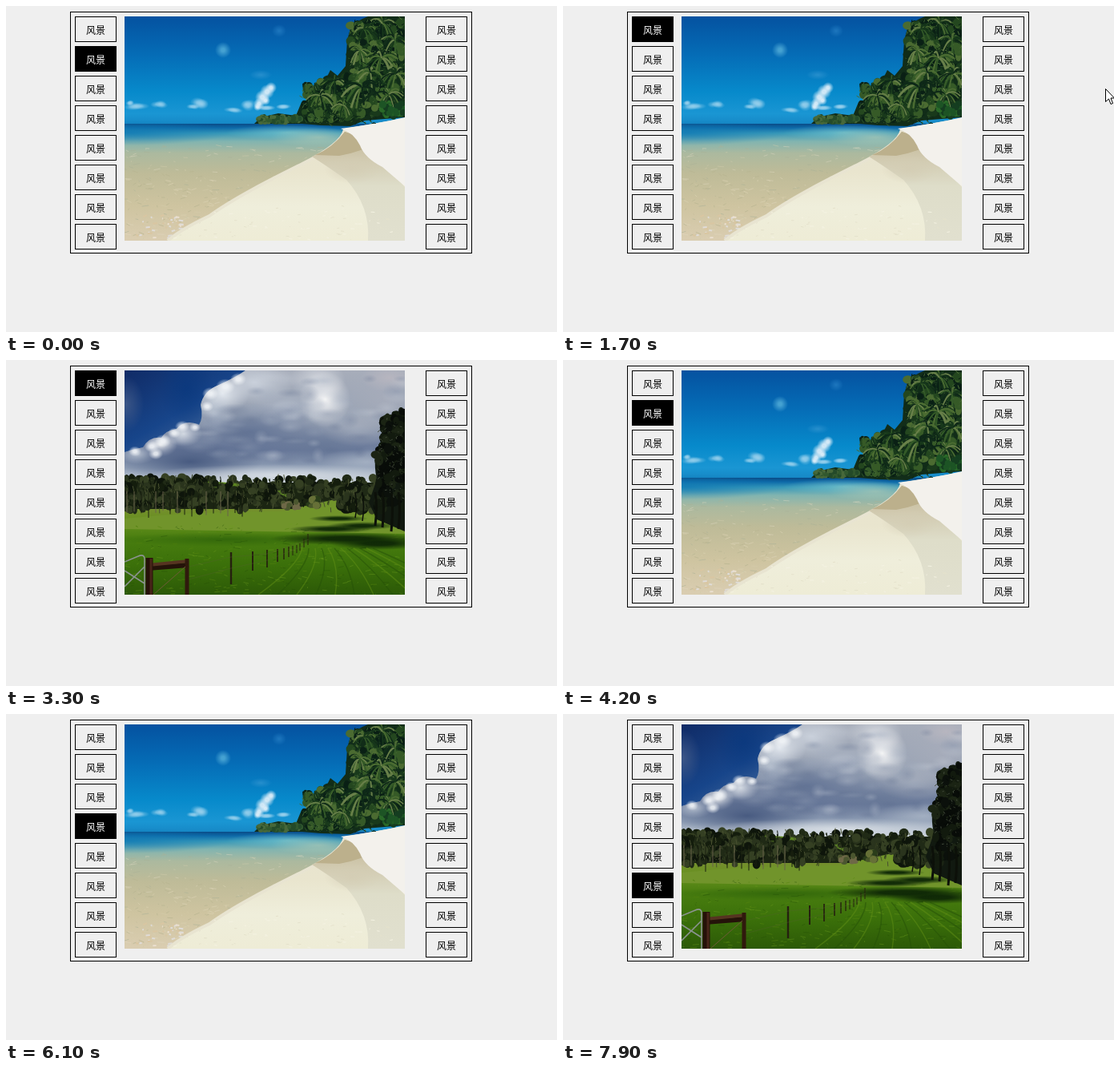
Recreate the animation shown at these times as an HTML page with a canvas. Size 688 px wide and 407 px high, loop 8000 ms.

```html
<!DOCTYPE html>
<html lang="zh-CN">
<head>
<meta charset="utf-8">
<style>
html, body { margin: 0; width: 100%; height: 100%; overflow: hidden; background: #efefef; }
#box { position: absolute; left: 80px; top: 7px; width: 500px; height: 300px; border: 1px solid #000; }
canvas { position: absolute; left: 148px; top: 13px; visibility: hidden; }
.tab { position: absolute; box-sizing: border-box; width: 52px; height: 32px; border: 1px solid #000;
  font: 12px/31px "Noto Sans CJK SC", "Noto Sans CJK", sans-serif; text-align: center; color: #000; }
.tab.on { background: #000; color: #fff; }
#cursor { position: absolute; visibility: hidden; }
</style>
</head>
<body>
<div id="box"></div>
<svg id="cursor" width="12" height="21"><path d="M.5.5V16.5L4.5 13L7 19.5L9.5 18.5L7 12H11.5Z" fill="#fff" stroke="#000"/></svg>
<script>
const cursor = document.getElementById('cursor');
let ctx, seed = 7;
const rnd = (a = 0, b = 1) => {
  seed = (seed * 16807) % 2147483647;
  return a + (b - a) * seed / 2147483647;
};
const pick = list => list[Math.floor(rnd(0, list.length))];

// Scenes are drawn in stage coordinates
function scene(draw) {
  const canvas = document.createElement('canvas');
  canvas.width = 350;
  canvas.height = 280;
  document.body.insertBefore(canvas, cursor);
  ctx = canvas.getContext('2d');
  ctx.translate(-148, -13);
  draw();
  return canvas;
}
function linear(x0, y0, x1, y1, stops) {
  const g = ctx.createLinearGradient(x0, y0, x1, y1);
  stops.forEach(([at, color]) => g.addColorStop(at, color));
  return g;
}
const down = (y0, y1, ...stops) => linear(0, y0, 0, y1, stops);
function rect(x, y, w, h, fill) {
  ctx.fillStyle = fill;
  ctx.fillRect(x, y, w, h);
}
function shape(d, fill) {
  ctx.fillStyle = fill;
  ctx.fill(new Path2D(d));
}
function line(d, color, width = 1) {
  ctx.strokeStyle = color;
  ctx.lineWidth = width;
  ctx.stroke(new Path2D(d));
}
function soft(x, y, rx, ry, rgb, alpha, core = 0) {
  ctx.save();
  ctx.translate(x, y);
  ctx.scale(rx, ry);
  const g = ctx.createRadialGradient(0, 0, core, 0, 0, 1);
  g.addColorStop(0, `rgba(${rgb},${alpha})`);
  g.addColorStop(1, `rgba(${rgb},0)`);
  ctx.fillStyle = g;
  ctx.fillRect(-1, -1, 2, 2);
  ctx.restore();
}
// Short random strokes inside a rectangle, optionally clipped by a path
function flecks(n, x, y, w, h, colors, dx, dy, width = 1, clip) {
  ctx.save();
  if (clip) ctx.clip(new Path2D(clip));
  for (let i = 0; i < n; i++) {
    const px = x + rnd(0, w), py = y + rnd(0, h);
    line(`M${px} ${py}l${rnd(-dx, dx)} ${rnd(-dy, dy)}`, pick(colors), width);
  }
  ctx.restore();
}
function bushes(n, x, y, w, h, r, colors) {
  for (let i = 0; i < n; i++) {
    ctx.fillStyle = pick(colors);
    ctx.beginPath();
    ctx.ellipse(x + rnd(0, w), y + rnd(0, h), rnd(.5, 1) * r, rnd(.5, 1) * r, 0, 0, 7);
    ctx.fill();
  }
}
function palm(x, y, r, colors, baseY) {
  if (baseY) line(`M${x} ${y}Q${x + 3} ${(y + baseY) / 2} ${x + 1} ${baseY}`, '#5b5430', 1.3);
  for (let i = 0; i < 20; i++) {
    const a = rnd(0, 6.28), len = r * rnd(.65, 1.05);
    const ex = x + Math.cos(a) * len, ey = y + Math.sin(a) * len * .75 + r * .35;
    line(`M${x} ${y}Q${(x + ex) / 2} ${(y + ey) / 2 - r * .4} ${ex} ${ey}`, pick(colors), Math.max(1.2, r / 11));
  }
}

function beach() {
  rect(148, 13, 350, 135, down(13, 148, [0, '#0552a0'], [.35, '#056cb6'], [.7, '#078acb'], [.9, '#1a96d3'], [1, '#1687c5']));
  soft(271, 55, 10, 10, '90,180,220', .75, .2);
  soft(341, 31, 9, 8, '40,130,200', .7);
  soft(318, 86, 14, 6, '70,160,215', .5);
  for (const [x, y, w, h] of [[165, 125, 18, 5], [154, 121, 7, 4], [191, 123, 12, 5], [240, 121, 14, 8], [233, 126, 9, 4],
    [285, 130, 14, 4], [301, 124, 12, 7], [347, 126, 14, 4], [322, 127, 16, 4]])
    for (let i = 0; i < 4; i++)
      soft(x + rnd(-w, w) * .4, y + rnd(-h, h) * .3, w * .6, h * .8, '160,212,238', .55, .1);
  for (const [x, y, r] of [[316, 122, 7], [320, 114, 9], [326, 107, 9], [331, 102, 7], [324, 118, 6], [314, 126, 5]])
    soft(x, y, r, r, '225,240,250', .9, .25);

  // Water turning from deep blue to shallow sand
  rect(148, 147, 350, 146, down(147, 293, [0, '#0a4c87'], [.035, '#0d69a8'], [.08, '#3798b8'], [.15, '#81b4b0'],
    [.25, '#abb99f'], [.42, '#bebb98'], [.7, '#cec4a0'], [1, '#dacdb1']));
  soft(150, 158, 130, 16, '14,120,180', .8);
  soft(350, 158, 75, 10, '125,200,205', .7);
  soft(390, 164, 60, 12, '185,205,180', .6);
  flecks(190, 148, 175, 260, 118, ['#d6cfae66', '#a9b19788', '#e3dcc566'], 9, 2);
  flecks(100, 148, 205, 130, 88, ['#dbd3b3aa', '#b8b491aa'], 7, 3);
  flecks(55, 165, 262, 60, 31, ['#eadfcf', '#d9c6a2', '#dfdcd8'], 6, 2, 2);

  const sand = 'M423 153C421 166 402 181 370 197S287 238 254 262Q218 279 202 293H498V140Z';
  shape(sand, down(150, 293, [0, '#e7e2ce'], [.4, '#e9e5ce'], [.7, '#efeedb'], [1, '#eeecd6']));
  line('M423 154C421 166 402 181 370 197S287 238 254 262Q218 279 202 293', '#e8e4d1', 4);
  shape('M423 157L436 161L446 176L470 195L498 226V293H452Q455 250 425 217Q398 198 382 188Q408 178 423 157Z',
    down(157, 293, [0, '#c0b593'], [.25, '#d1cab0'], [.5, '#deddc9'], [1, '#e1e0cf']));
  shape('M423 157L437 162L446 179L430 184L416 187L386 186Q408 177 423 157Z', '#bcb08c');
  soft(432, 204, 35, 18, '211,204,179', .7);
  shape('M418 153Q460 148 498 139V225L470 201Q448 190 442 174Q434 158 418 153Z', '#f3f1ec');
  flecks(80, 205, 250, 280, 43, ['#e5e2cc', '#f4f2e2'], 5, 1, 1, sand);

  const greens = ['#112c18', '#19391b', '#24471f', '#0a2015', '#365a27', '#4b6b31'];
  shape('M310 147L318 139L340 134L362 137L369 120L382 115L385 96L399 92L405 80L414 87L424 75L426 43L431 24L445 16L452 13H498V139L448 143L430 150L394 149L370 147Z', '#122d19');
  bushes(70, 314, 138, 55, 7, 4, ['#31582e', '#244a29', '#47683a']);
  bushes(75, 372, 98, 42, 45, 6, greens);
  bushes(70, 390, 87, 105, 50, 8, greens);
  bushes(110, 429, 20, 69, 83, 7, greens);
  flecks(250, 429, 17, 69, 112, ['#315629', '#091d13', '#51713a', '#3e6031'], 5, 6);
  flecks(110, 370, 95, 55, 48, ['#466a36', '#0c2718', '#2c522a'], 4, 5);
  for (const [x, y, r] of [[447, 29, 18], [470, 22, 20], [486, 42, 19], [441, 55, 18], [410, 94, 18], [469, 65, 23],
    [487, 85, 21], [455, 83, 22], [444, 101, 27], [392, 112, 18], [478, 110, 20], [421, 124, 17]])
    palm(x, y, r, ['#17371b', '#345a28', '#4b6c32', '#69804a', '#0e2818']);
  bushes(45, 470, 121, 28, 17, 5, ['#1d5425', '#2a6928', '#153d20']);
  flecks(55, 384, 137, 80, 10, ['#0c2615', '#365b2a'], 5, 4);
}

function field() {
  rect(148, 13, 350, 145, linear(148, 13, 230, 150, [[0, '#102b66'], [.5, '#17458a'], [1, '#5877a0']]));
  soft(150, 55, 22, 35, '85,105,145', .6);
  soft(225, 35, 35, 45, '8,55,125', .7);
  const cloud = 'M148 115Q160 111 171 109Q179 95 194 97Q199 88 213 86Q224 73 241 81Q247 72 243 56Q247 38 266 31Q286 22 299 13H498V157H148Z';
  shape(cloud, down(13, 155, [0, '#a7adba'], [.4, '#99a3b4'], [.7, '#69799a'], [.86, '#8e9db4'], [1, '#d1d8df']));
  ctx.save();
  ctx.clip(new Path2D(cloud));
  for (const [x, y, rx, ry, rgb, a] of [
    [270, 42, 34, 25, '230,235,241', 1], [310, 28, 50, 27, '206,213,223', .9], [260, 67, 22, 30, '199,208,220', .8],
    [193, 106, 21, 15, '242,243,244', 1], [222, 92, 23, 16, '219,224,231', 1], [165, 118, 22, 12, '209,217,226', .9],
    [398, 49, 32, 35, '247,247,247', 1], [389, 25, 35, 25, '220,223,229', .8], [350, 61, 50, 27, '174,183,199', .8],
    [305, 90, 90, 36, '92,110,145', .8], [230, 127, 90, 25, '66,85,124', .9], [397, 107, 65, 24, '101,118,149', .7],
    [472, 49, 50, 45, '168,173,187', .7], [439, 83, 50, 25, '176,182,194', .6], [478, 22, 35, 18, '190,186,194', .7],
    [450, 127, 65, 16, '176,187,202', .7], [345, 144, 170, 14, '218,224,230', .9]])
    soft(x, y, rx, ry, rgb, a);
  for (let i = 0; i < 95; i++)
    soft(rnd(240, 498), rnd(20, 130), rnd(8, 24), rnd(4, 11), pick(['209,215,224', '92,108,141', '158,170,189']), .25);
  ctx.restore();
  for (const [x, y, r] of [[255, 42, 10], [274, 33, 12], [290, 24, 10], [251, 58, 8], [210, 91, 8], [196, 101, 10],
    [220, 83, 9], [236, 84, 7], [182, 108, 9], [161, 114, 8], [187, 117, 9]])
    soft(x, y, r, r * .8, '242,245,248', .85, .25);

  const greens = ['#141d0d', '#202a16', '#2a341d', '#0e150b', '#354023'];
  rect(148, 153, 350, 39, '#1b2512');
  bushes(75, 148, 146, 92, 13, 6, greens);
  bushes(80, 230, 146, 268, 18, 6, greens);
  shape('M230 153Q265 149 310 158V163Q280 163 249 157Z', '#5d8521');
  shape('M335 164Q349 156 357 163L354 173Z', '#597d25');
  rect(148, 186, 350, 107, down(186, 293, [0, '#758f2e'], [.15, '#65901d'], [.35, '#487d0f'], [.65, '#3b700a'], [1, '#2c5907']));
  shape('M148 198Q240 188 345 189Q382 180 411 174L432 190L498 200V217L148 211Z', '#71942b');
  bushes(150, 148, 151, 155, 37, 6, greens);
  bushes(45, 305, 153, 52, 27, 6, greens);
  bushes(65, 363, 152, 88, 20, 6, greens);
  bushes(70, 414, 158, 50, 29, 8, greens);
  flecks(350, 148, 148, 305, 38, ['#48502f', '#0d150a', '#343e20'], 2, 7);
  for (let x = 151; x < 300; x += 9) line(`M${x} 164V${rnd(188, 197)}`, pick(['#69624b', '#1b2010']));
  bushes(13, 377, 172, 13, 12, 5, ['#49572a', '#2a3d1a', '#667037']);
  bushes(13, 346, 177, 19, 8, 4, ['#6e6847', '#4b562f']);

  flecks(330, 148, 205, 350, 88, ['#6f9d2066', '#234f0766', '#55840e88'], 9, 2);
  soft(275, 224, 140, 9, '31,83,7', .5);
  for (const [x, y, rx, ry] of [[425, 223, 96, 8], [407, 211, 54, 5], [466, 229, 62, 8], [415, 198, 37, 4], [445, 207, 45, 5]])
    soft(x, y, rx, ry, '14,39,6', .95, .3);
  for (let i = 0; i < 12; i++)
    line(`M${370 + i * 8} 235Q${365 + i * 13} 257 ${315 + i * 24} 293`, i % 2 ? '#26510988' : '#6290157a', 1.5);

  // Near trees on the right
  const dark = ['#0b100b', '#121a0e', '#1b2414', '#080c08'];
  shape('M498 61Q472 76 471 101Q456 118 463 149L453 178L463 199L498 214Z', '#111910');
  bushes(90, 470, 72, 30, 72, 8, dark);
  bushes(75, 462, 107, 36, 82, 8, dark);
  bushes(25, 484, 61, 15, 20, 5, dark);
  flecks(120, 466, 73, 32, 105, ['#30372a', '#424b3b', '#050906'], 3, 3);
  for (const [x, y] of [[436, 197], [445, 201], [461, 207], [470, 209], [481, 214], [490, 211]])
    line(`M${x} 165Q${x + 3} 183 ${x} ${y}`, '#0c1009', x > 450 ? 3 : 1.5);

  for (const [x, top, end, w] of [[281, 240, 280, 2.4], [308, 239, 263, 2], [326, 237, 259, 1.7], [339, 236, 252, 1.6],
    [347, 235, 249, 1.4], [353, 233, 246, 1.3], [358, 232, 244, 1], [363, 231, 241, 1], [367, 229, 238, 1], [372, 223, 234, 1], [377, 217, 231, 1]])
    line(`M${x} ${top}V${end}`, '#25200f', w);
  line('M228 258L281 246L326 242L378 224M228 274L281 260L326 250L372 232', '#52602c88', .7);
  line('M148 252L165 245Q174 241 173 251V293M148 263L173 279M148 283L173 258', '#8b9390', 1.6);
  line('M177 260L228 256', '#241309', 6);
  line('M178 256L228 251', '#563421', 4);
  line('M179 247V293', '#251109', 9);
  line('M181 248V293', '#482519', 3);
  line('M226 248V293', '#30190d', 5);
  line('M184 293L224 258', '#6d5b36', 1);
}

function island() {
  rect(148, 13, 350, 163, linear(440, 0, 340, 180, [[0, '#020d48'], [.25, '#032269'], [.52, '#064292'], [.78, '#085fae'], [1, '#0874bb']]));
  soft(498, 13, 125, 80, '1,8,52', .85);
  soft(160, 160, 135, 55, '4,119,192', .6);
  soft(162, 132, 17, 3, '78,154,205', .6);
  soft(219, 151, 8, 3, '143,190,220', .8);
  soft(188, 149, 11, 2, '66,145,200', .6);
  rect(148, 181, 350, 112, down(181, 293, [0, '#077b9f'], [.06, '#078699'], [.25, '#0794a0'], [.5, '#078e9a'], [.78, '#088189'], [1, '#076e7d']));
  soft(325, 223, 180, 28, '4,166,170', .5);
  soft(465, 278, 100, 26, '4,111,133', .5);
  for (let y = 190; y < 293; y += 5) {
    const size = 4 + (y - 190) * .1;
    flecks(25, 148, y, 350, 6, ['#16b0b38a', '#056d817a', '#0ba4a997', '#03617366'], size, 1 + size * .2, 1 + (y - 190) / 100);
  }
  flecks(75, 155, 250, 330, 41, ['#55bcb38a', '#2ba9a577', '#056574aa'], 8, 4, 1.1);

  const greens = ['#173b22', '#294c26', '#3e6430', '#102d21', '#526b2c', '#706f2e'];
  shape('M148 177Q178 172 214 173L232 166Q280 160 318 170L350 165L383 171L430 170L498 172V176H148Z', '#2e512d');
  bushes(75, 237, 154, 79, 17, 6, greens);
  bushes(60, 309, 151, 78, 20, 6, greens);
  bushes(25, 400, 160, 24, 11, 5, greens);
  for (const [x, y, r] of [[234, 137, 11], [258, 144, 14], [290, 130, 15], [327, 117, 17], [383, 132, 14], [411, 150, 14]])
    palm(x, y, r, ['#304821', '#566a2f', '#8a8c4d', '#213d25', '#798046'], 173);
  for (const [x, y, r] of [[249, 154, 15], [270, 155, 14], [291, 155, 17], [318, 157, 16], [342, 149, 18], [357, 151, 19],
    [383, 160, 14], [411, 162, 13], [232, 167, 10], [432, 166, 8]])
    palm(x, y, r, ['#1c3c21', '#345b2c', '#59702f', '#858449', '#122e20'], 174);
  flecks(45, 307, 151, 53, 20, ['#9a8b43', '#a66e2b', '#7d873e'], 4, 7, 1.2);
  bushes(55, 248, 167, 50, 6, 4, ['#46731e', '#5c8329', '#385f1d']);
  flecks(150, 148, 172, 350, 4, ['#284b2b', '#4a6130', '#6d6a46'], 5, 2);
  shape('M148 178Q190 174 260 175T390 174L498 174V182L435 185Q300 190 148 187Z', down(174, 188, [0, '#d9cab8'], [.4, '#f4e8dc'], [1, '#e5d3c4']));
  line('M148 188Q300 191 435 186L498 183', '#77babb', 1.4);
  flecks(45, 155, 177, 335, 5, ['#c5b19e', '#fff4eb'], 6, .7);
}

const scenes = { beach: scene(beach), field: scene(field), island: scene(island) };

const tabs = { L: [], R: [] };
for (const side of 'LR')
  for (let i = 0; i < 8; i++) {
    const tab = document.createElement('div');
    tab.className = 'tab';
    tab.textContent = '风景';
    tab.style.left = (side === 'L' ? 86 : 524) + 'px';
    tab.style.top = 13 + i * 37 + 'px';
    document.body.insertBefore(tab, cursor);
    tabs[side].push(tab);
  }

// start time, column, row, picture
const steps = [
  [0, 'L', 2, 'beach'], [100, 'R', 8, 'island'], [300, 'R', 7, 'beach'], [400, 'R', 6, 'field'],
  [1500, 'L', 1, 'beach'], [2300, 'R', 1, 'beach'], [2400, 'R', 1, 'island'], [3300, 'L', 1, 'field'],
  [4200, 'L', 2, 'beach'], [5900, 'L', 3, 'beach'], [6000, 'L', 3, 'field'], [6100, 'L', 4, 'beach'],
  [7000, 'L', 5, 'island'], [7900, 'L', 6, 'field']
];
// start time, end time, x, y
const visits = [[1700, 2300, 677, 103], [5100, 5900, 648, 394]];

function show(t) {
  const [, side, row, name] = steps.filter(s => s[0] <= t).pop();
  for (const key in scenes) scenes[key].style.visibility = key === name ? 'visible' : 'hidden';
  for (const key in tabs) tabs[key].forEach((tab, i) => tab.classList.toggle('on', key === side && i === row - 1));
  const visit = visits.find(v => t >= v[0] && t < v[1]);
  cursor.style.visibility = visit ? 'visible' : 'hidden';
  if (visit) {
    cursor.style.left = visit[2] + 'px';
    cursor.style.top = visit[3] + 'px';
  }
}
const start = performance.now();
function tick() {
  show((performance.now() - start) % 8000);
  requestAnimationFrame(tick);
}
tick();
</script>
</body>
</html>
```
